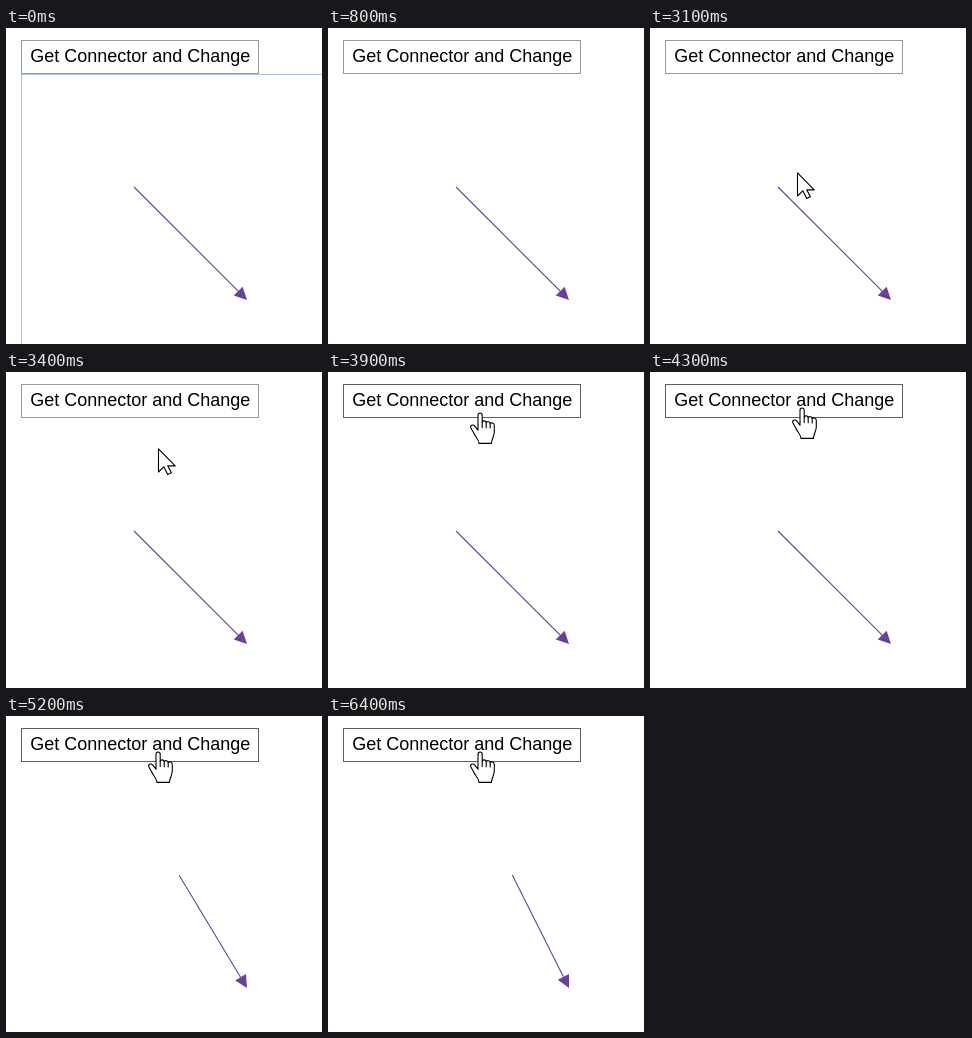
Write an HTML page that moves like this. It is 316 px wide and 316 px high and loops after 8000 ms.

```html
<!DOCTYPE html>
<html lang="en">
<head>
<meta charset="utf-8">
<title>Connector demo</title>
<style>
  html, body { margin: 0; width: 100%; height: 100%; overflow: hidden; background: #fff; }
  svg { display: block; width: 100vw; height: 100vh; }
  text { font: 18px "Liberation Sans", Arial, sans-serif; fill: #000; }
  .cursor { fill: #fff; stroke: #000; stroke-width: 1.1; stroke-linejoin: round; stroke-linecap: round; }
</style>
</head>
<body>
<svg viewBox="0 0 316 316">
  <rect id="button" x="15.5" y="12.5" width="237" height="33" fill="#fff"/>
  <text id="label" x="24.2" y="34">Get Connector and Change</text>
  <g id="frame" fill="none">
    <path d="M15.5 46V316" stroke="#b9bcc0"/>
    <path d="M15 46.5H316" stroke="#a9c3e2"/>
  </g>
  <path id="line" fill="none" stroke="#6b3fa0" stroke-width="1.1"/>
  <path id="head" fill="#6b3fa0"/>
  <path id="arrow" class="cursor" d="M.5 .8V24L5.8 18.8L9.7 26.4L13.4 24.7L9.8 17.9H17.2Z"/>
  <g id="hand" class="cursor">
    <path d="M8 16.5V3.2C8 .2 12.2 .2 12.2 3.2V10.2C12.6 8.2 16.2 8.4 16.2 10.8C16.8 9 20.2 9.4 20.2 11.8C21 10.3 24.3 10.8 24.3 13.6V20C24.3 24 22 26 21.4 31.4H9C8.6 27 5.2 24.8 3.6 20.8L.9 16C-.2 13.4 3 12 4.8 14.2L8 18.2Z"/>
    <path fill="none" d="M12.2 10V15.6M16.2 10.8V15.8M20.2 11.8V16"/>
  </g>
</svg>
<script>
const LOOP = 8000;
const END = [241, 272];
const HEAD = { length: 12.5, half: 6.3 };

// [time, value]; each value holds until the next step
const pointer = [
  [0, null],
  [2600, ["arrow", 273, 191]], [2700, ["arrow", 232, 180]],
  [2800, ["arrow", 184, 169]], [2900, ["arrow", 155, 167]],
  [3100, ["arrow", 147, 144]], [3200, ["arrow", 144, 114]],
  [3300, ["arrow", 149, 88]], [3400, ["arrow", 152, 76]],
  [3600, ["arrow", 152, 69]], [3700, ["arrow", 152, 59]],
  [3800, ["arrow", 152, 49]], [3900, ["hand", 142, 40]],
  [4000, ["hand", 142, 38]], [4200, ["hand", 142, 33]],
  [4300, ["hand", 142, 35]]
];
const border = [[0, "#9a9a9a"], [3900, "#5f5f5f"], [5000, "#a2a2a2"], [5100, "#5f5f5f"]];
const startX = [[0, 128], [5200, 173], [6200, 184.3]];
const outline = [[0, "inline"], [100, "none"]];

const el = id => document.getElementById(id);
const at = (steps, t) => steps.filter(s => s[0] <= t).pop()[1];

function drawConnector(x, y) {
  const [ex, ey] = END;
  const len = Math.hypot(ex - x, ey - y);
  const ux = (ex - x) / len, uy = (ey - y) / len;
  const bx = ex - ux * HEAD.length, by = ey - uy * HEAD.length;
  const px = -uy * HEAD.half, py = ux * HEAD.half;
  el("line").setAttribute("d", `M${x} ${y}L${bx} ${by}`);
  el("head").setAttribute("d", `M${ex} ${ey}L${bx + px} ${by + py}L${bx - px} ${by - py}Z`);
}

function drawPointer(state) {
  for (const id of ["arrow", "hand"]) {
    const shown = state && state[0] === id;
    el(id).style.display = shown ? "inline" : "none";
    if (shown) el(id).setAttribute("transform", `translate(${state[1]} ${state[2]})`);
  }
}

function draw(t) {
  el("frame").style.display = at(outline, t);
  el("button").setAttribute("stroke", at(border, t));
  drawConnector(at(startX, t), 159);
  drawPointer(at(pointer, t));
}

const begin = performance.now();
function tick() {
  draw((performance.now() - begin) % LOOP);
  requestAnimationFrame(tick);
}
tick();
</script>
</body>
</html>
```
